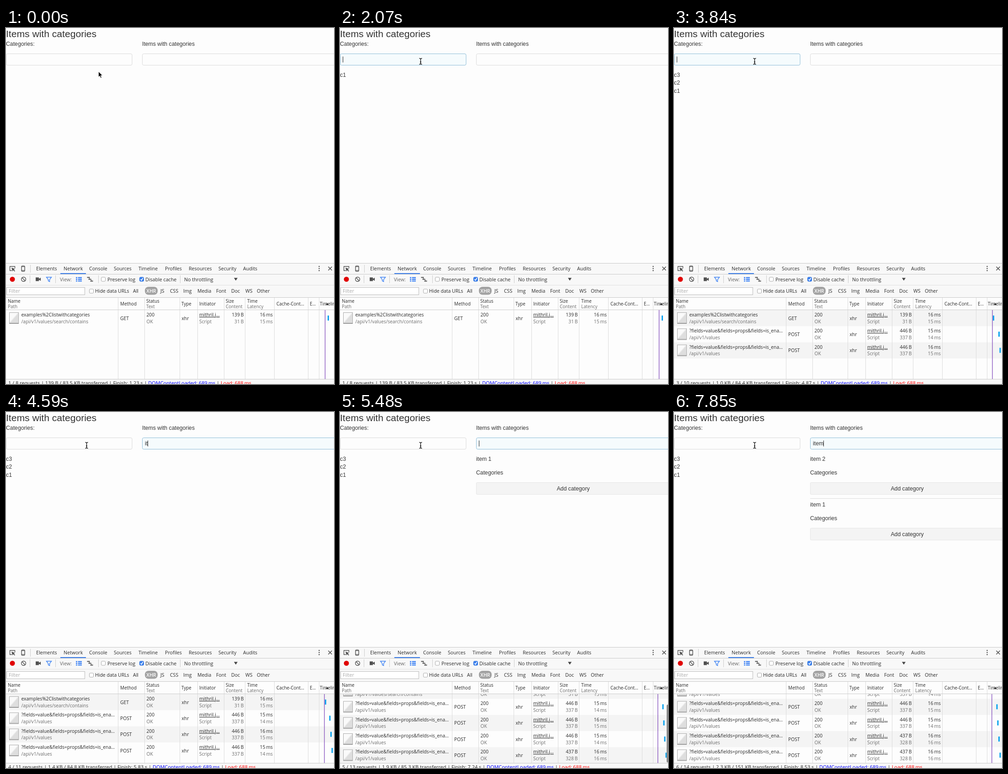
An HTML page for the animation above (8 s loop, 718x780 px).

```html
<!DOCTYPE html>
<html lang="en">
<head>
<meta charset="utf-8">
<title>Items with categories</title>
<style>
  html, body { margin: 0; width: 718px; height: 780px; overflow: hidden; background: #fdfdfd; }
  svg { display: block; }
  text { white-space: pre; }
  .page { font: 12.25px "Liberation Sans", Arial, sans-serif; fill: #333; }
  .tool { font: 10.6px "Open Sans", "Noto Sans", sans-serif; fill: #2a2a2a; }
  .grid { font: 10.25px "Open Sans", "Noto Sans", sans-serif; fill: #2a2a2a; }
  .head { font-size: 9.9px; }
  .sub { fill: #6c6c6c; }
  .end { text-anchor: end; }
  .mid { text-anchor: middle; }
  .link { text-decoration: underline; }
</style>
</head>
<body>
<svg id="stage" width="718" height="780">
  <defs>
    <linearGradient id="paper" x2="1" y2="1">
      <stop offset=".45" stop-color="#fafafa"/><stop offset=".55" stop-color="#dedede"/>
    </linearGradient>
  </defs>
  <g id="page" class="page"></g>
  <g id="panel" class="tool"></g>
  <g id="grid" class="grid"></g>
  <g id="pointer"></g>
</svg>
<script>
const LOOP = 8000, ROW = 35.35, GRID_TOP = 618, GRID_HEIGHT = 152, BAR = '#f8f8f8';
const el = id => document.getElementById(id);
const esc = s => String(s).replace(/&/g, '&amp;').replace(/</g, '&lt;');
const text = (x, y, s, cls = '', extra = '') =>
  `<text x="${x}" y="${y}" class="${cls}" ${extra}>${esc(s)}</text>`;
const rect = (x, y, w, h, fill, extra = '') =>
  `<rect x="${x}" y="${y}" width="${w}" height="${h}" fill="${fill}" ${extra}/>`;
const path = (d, stroke, extra = '') => `<path d="${d}" fill="none" stroke="${stroke}" ${extra}/>`;

// Each list holds [start time, value...]; the latest entry already started wins.
const at = (list, t) => list.filter(k => k[0] <= t).pop();

const POINTER = [[0, 202, 95], [290, 199, 91], [440, 190, 83], [590, 181, 76], [740, 176.5, 73]];
const FOCUS = [[0, ''], [890, 'left'], [3990, 'right']];
const LEFT = [[0, ''], [1630, 'c'], [1920, 'c1'], [2070, ''], [2370, 'c'], [2670, 'c2'], [2810, ''],
  [3110, 'c'], [3400, 'c3'], [3840, '']];
const RIGHT = [[0, ''], [4440, 'i'], [4590, 'it'], [4730, 'ite'], [4880, 'item '], [5030, 'item 1'],
  [5180, ''], [5630, 'it'], [5770, 'item'], [5920, 'item '], [6070, 'item 2'], [6510, ''],
  [6960, 'i'], [7110, 'it'], [7260, 'ite'], [7410, 'item']];
const CATEGORIES = [[2070, 'c1'], [2810, 'c2'], [3840, 'c3']];
const ITEMS = [[5180, 'item 1'], [6510, 'item 2']];
// start, requests, all requests, size, total, finish, load line x, tick xs
const NETWORK = [
  [0, 1, 8, '139 B', '83.5 KB', '1.23', 698.5, [705.5]],
  [2370, 2, 9, '585 B', '84.0 KB', '3.90', 697.5, [702, 713.5]],
  [3110, 3, 10, '1.0 KB', '84.4 KB', '4.87', 697, [699.5, 711.5, 714]],
  [4140, 4, 11, '1.4 KB', '84.8 KB', '5.83', 697, [699.5, 709, 711.5, 714]],
  [5480, 5, 13, '1.9 KB', '85.3 KB', '7.24', 695.8, [698, 707, 709, 711, 714]],
  [6210, 5, 13, '1.9 KB', '151 KB', '7.94', 695.8, [698, 706, 708, 710, 712]],
  [6810, 6, 14, '2.3 KB', '151 KB', '8.53', 695.8, [698, 704, 707, 709, 711.5, 714]]
];
// size, content, time, latency
const REQUESTS = [[139, 31, 16, 15], [446, 337, 15, 14], [446, 337, 16, 15],
  [446, 337, 15, 14], [437, 328, 16, 16], [437, 328, 16, 16]];

const ruler = document.createElement('canvas').getContext('2d');
ruler.font = '12.25px "Liberation Sans", Arial, sans-serif';

function field(x, w, value, focused, caret) {
  const caretX = Math.round(x + 6 + ruler.measureText(value).width) + .5;
  return rect(x + .5, 56.5, w, 25, focused ? '#f5fbfd' : '#fdfdfd',
      `rx="3" stroke="${focused ? '#8dbdd8' : '#dadada'}"`) +
    text(x + 6, 73, value) +
    (focused && caret ? path(`M${caretX} 62.5v13`, '#222') : '');
}

function drawPage(t) {
  const focus = at(FOCUS, t)[1];
  const caret = t < 7560 || t >= 7850;
  const shown = list => list.filter(k => k[0] <= t).reverse();
  return text(0, 20, 'Items with categories', '', 'font-size="21.1"') +
    text(0, 39, 'Categories:') + text(298, 39, 'Items with categories') +
    field(0, 275.5, at(LEFT, t)[1], focus === 'left', caret) +
    field(298, 430, at(RIGHT, t)[1], focus === 'right', caret) +
    shown(CATEGORIES).map((k, i) => text(0, 107 + 17.3 * i, k[1])).join('') +
    shown(ITEMS).map((k, i) => `<g transform="translate(0 ${100 * i})">` +
      (i ? path('M298 89.5h420', '#ddd') : '') +
      text(298, 107, k[1]) + text(298, 137, 'Categories') +
      rect(298.5, 154.5, 430, 26, '#f4f4f4', 'rx="2" stroke="#e5e5e5"') +
      text(510.5, 172, 'Add category', 'mid') + '</g>').join('');
}

function drawPanel() {
  const labels = (y, list, size) => list.map(([x, s]) => text(x, y, s, '', `font-size="${size}"`)).join('');
  const checkbox = (x, y, on) =>
    rect(x + .5, y + .5, 9, 9, on ? '#3b82f0' : '#fff', `rx="2" stroke="${on ? '#2f70da' : '#aaa'}"`) +
    (on ? path(`M${x + 2.5} ${y + 5}l2 2.5l3.5 -5.5`, '#fff', 'stroke-width="1.5"') : '');
  const ink = '#505050', blue = '#4285f4';
  return rect(0, 515, 718, 76, BAR) +
    path('M0 515.5h718M0 539.5h718M0 590.5h718', '#c8c8c8') + path('M0 563.5h718', '#e0e0e0') +
    rect(119, 537, 56, 2, '#3b7de8') +
    path('M53.5 519v17M52.5 542v17M108.5 542v17M202.5 542v17M381.5 542v17', '#ccc') +
    // inspect and device icons
    path('M13 531.5H8.5v-9h11v4', ink, 'stroke-width="1.3"') +
    `<path d="M12 525l8 3l-3 1.3l3 3l-1.3 1.3l-3 -3l-1.3 3z" fill="${ink}"/>` +
    rect(34, 521.5, 7, 11.5, 'none', `rx="1.5" stroke="${ink}" stroke-width="1.4"`) +
    path('M34 523h7M34 531h7', ink) +
    labels(531, [[66, 'Elements'], [126, 'Network'], [182, 'Console'], [236, 'Sources'], [290, 'Timeline'],
      [348, 'Profiles'], [400, 'Resources'], [465, 'Security'], [519, 'Audits']], 10.6) +
    [522.5, 527, 531.5].map(y => `<circle cx="685.5" cy="${y}" r="1.3" fill="${ink}"/>`).join('') +
    path('M705.5 523l8 8m0 -8l-8 8', ink, 'stroke-width="1.6"') +
    // toolbar icons
    '<circle cx="14" cy="550.5" r="5.5" fill="#e00000"/>' +
    `<circle cx="38.5" cy="550.5" r="4.8" fill="none" stroke="${ink}" stroke-width="1.4"/>` +
    path('M35 547l7 7', ink, 'stroke-width="1.4"') +
    `<path d="M65 546.5h7v3l4 -2.5v7l-4 -2.5v3h-7z" fill="${ink}"/>` +
    path('M88.5 546h11l-4 5v4.5l-3 -1.5v-3z', blue, 'stroke-width="1.4"') +
    text(118, 554.5, 'View:', '', 'fill="#666"') +
    path('M153 547h3m1.5 0h8.5M153 550.7h3m1.5 0h8.5M153 554.4h3m1.5 0h8.5', blue, 'stroke-width="2.4"') +
    path('M177.5 546.5h6M180.5 550.5h6M184.5 554.5h6', ink, 'stroke-width="1.8"') +
    path('M182.5 547v3M186.5 551v3', ink) +
    checkbox(208, 545.5) + checkbox(292, 545.5, true) +
    labels(554.5, [[222, 'Preserve log'], [305, 'Disable cache'], [390, 'No throttling']], 10.7) +
    '<path d="M499 547.5h8l-4 6z" fill="#444"/>' +
    // filter row
    rect(1.5, 568.5, 171, 16, '#fff', 'stroke="#bbb"') + text(6, 580, 'Filter', '', 'fill="#aaa"') +
    checkbox(182, 571.5) +
    rect(304, 567, 28, 17.5, '#a2a2a2', 'rx="8"') +
    text(318, 580, 'XHR', 'mid', 'style="fill:#fff;font-weight:600"') +
    labels(580, [[195, 'Hide data URLs'], [278, 'All'], [338, 'JS'], [359, 'CSS'], [388, 'Img'], [419, 'Media'],
      [460, 'Font'], [493, 'Doc'], [524, 'WS'], [549, 'Other']], 10.5) +
    // column titles
    [[4, 'Name', 'Path'], [307, 'Status', 'Text'], [481, 'Size', 'Content'], [528, 'Time', 'Latency']]
      .map(([x, a, b]) => text(x, 601.5, a, 'head') + text(x, 613.5, b, 'head sub')).join('') +
    [[250, 'Method'], [384, 'Type'], [423, 'Initiator'], [592, 'Cache-Cont…'], [665, 'E…'], [687, 'Timeline']]
      .map(([x, s]) => text(x, 607.5, s, 'head')).join('') +
    '<path d="M700 607l3 -5l3 5z" fill="#333"/>';
}

function drawRow(i, tick) {
  const [size, content, time, latency] = REQUESTS[i];
  const pair = (x, a, b, cls = '') => text(x, 14, a, cls) + text(x, 28.5, b, 'sub ' + cls);
  const thin = '\u2009';
  return rect(7.5, 5.5, 20, 23, 'url(#paper)', 'stroke="#aaa"') +
    path('M7 29.5h21', '#888') +
    (i ? pair(33.5, '?fields=value&fields=props&fields=is_ena…', '/api/v1/values')
       : pair(33.5, 'examples%2Clistwithcategories', '/api/v1/values/search/contains')) +
    text(250, 21.8, i ? 'POST' : 'GET') + pair(307.5, 200, 'OK') + text(384.5, 21.8, 'xhr') +
    text(423, 14, 'mithril.j…', 'link') + text(423, 28.5, 'Script', 'sub') +
    pair(520.5, size + thin + 'B', content + thin + 'B', 'end') +
    pair(584, time + thin + 'ms', latency + thin + 'ms', 'end') +
    rect(tick - 1.5, 12, 3, 11, '#0aa2ee');
}

function drawGrid(t) {
  const [start, count, total, size, sum, finish, lineX, ticks] = at(NETWORK, t);
  const scroll = Math.max(0, count * ROW - GRID_HEIGHT + .25);
  const rows = ticks.map((tick, i) => `<g transform="translate(0 ${i * ROW - scroll})">` +
    (count > 1 && i % 2 === 0 ? rect(0, 0, 718, ROW, '#f4f4f4') : '') + drawRow(i, tick) + '</g>').join('');
  const scrollbar = (t >= 5480 && t < 6070) || (t >= 6810 && t < 7410);
  const span = (s, fill) => `<tspan fill="${fill}">${s}</tspan>`;
  return `<svg y="${GRID_TOP}" width="718" height="${GRID_HEIGHT}">${rows}</svg>` +
    path([245.5, 303.5, 380.5, 419.5, 477.5, 523.5, 587.5, 661.5, 685.5].map(x => `M${x} 591v179`).join(''), '#dcdcdc') +
    path('M0 617.5h718', '#ccc') +
    path(`M${lineX} 618v152`, '#7a3fb8', 'stroke-width="1.2"') +
    (scrollbar ? rect(715, 641, 6, 127, '#8c8c8c', 'rx="3"') : '') +
    rect(0, 770, 718, 10, BAR) + path('M0 769.5h718', '#c8c8c8') +
    `<text x="5" y="781.5" font-size="10.93">${count} / ${total} requests | ${size} / ${sum} transferred | ` +
    `Finish: ${finish} s | ${span('DOMContentLoaded: 689\u2009ms', '#00f')} | ${span('Load: 688\u2009ms', '#f00')}</text>`;
}

function drawPointer(t) {
  const [, x, y] = at(POINTER, t);
  const shape = t < 440
    ? '<path d="M.5 .5v12l2.8 -2.6l2 4.6l2.1 -.9l-2 -4.5h3.8z" fill="#000" stroke="#fff" stroke-width=".8"/>'
    : path('M-3 -6.5q3 0 3 2v9q0 2 3 2M3 -6.5q-3 0 -3 2M0 4.5q0 2 -3 2M-1.5 1.5h3', '#111', 'stroke-width="1.3"');
  return `<g transform="translate(${x} ${y})">${shape}</g>`;
}

const drawn = {};
function paint(id, markup) {
  if (drawn[id] !== markup) el(id).innerHTML = drawn[id] = markup;
}

paint('panel', drawPanel());
const begin = performance.now();
function frame() {
  const t = (performance.now() - begin) % LOOP;
  paint('page', drawPage(t));
  paint('grid', drawGrid(t));
  paint('pointer', drawPointer(t));
  requestAnimationFrame(frame);
}
frame();
</script>
</body>
</html>
```
